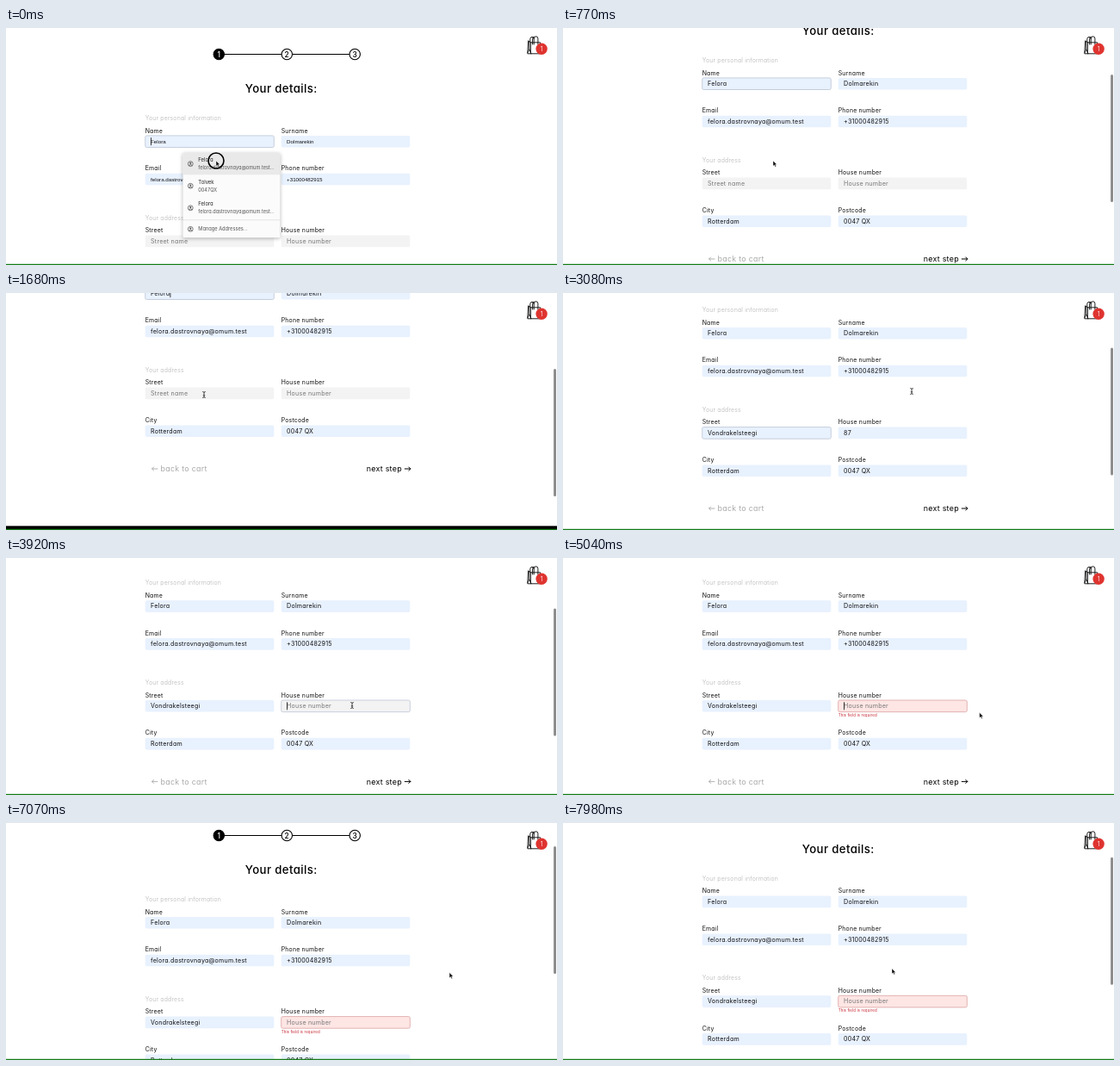
Recreate the animation shown at these times as an HTML page. Size 640 by 275 pixels, loop 8 s.

```html
<!DOCTYPE html>
<html lang="en">
<head>
<meta charset="utf-8">
<title>Checkout details</title>
<style>
  html, body { margin: 0; width: 100%; height: 100%; overflow: hidden; background: #fff; }
  svg { display: block; width: 640px; height: 275px; }
  text { font-family: Inter, "Open Sans", sans-serif; font-feature-settings: "cv11"; white-space: pre; }
  .page text { letter-spacing: .03em; }
  .page text.preview { font-family: "Liberation Sans", Arial, sans-serif; font-size: 6.2px; letter-spacing: 0; }
  .menu { filter: drop-shadow(0 1px 2px rgba(0, 0, 0, .3)); }
</style>
</head>
<body>
<svg id="stage" viewBox="0 0 640 275"></svg>
<script>
const LOOP = 8000, STEP = 70;
const stage = document.getElementById('stage');

function el(parent, tag, attrs = {}) {
  const node = document.createElementNS('http://www.w3.org/2000/svg', tag);
  for (const k in attrs) node.setAttribute(k, attrs[k]);
  parent.appendChild(node);
  return node;
}
function label(parent, x, y, str, size, fill = '#111', weight = 400, anchor = 'start') {
  const node = el(parent, 'text', { x, y, fill, 'font-size': size, 'font-weight': weight, 'text-anchor': anchor });
  node.textContent = str;
  return node;
}
const box = (parent, x, y, width, height, fill, rx = 0) =>
  el(parent, 'rect', { x, y, width, height, fill, rx });
const line = (parent, d, stroke = '#000', width = 1) =>
  el(parent, 'path', { d, stroke, 'stroke-width': width, fill: 'none', 'stroke-linecap': 'round', 'stroke-linejoin': 'round' });
const show = (node, on) => node.setAttribute('visibility', on ? 'visible' : 'hidden');
const move = (node, x, y) => node.setAttribute('transform', `translate(${x} ${y})`);

// Scrolling page
const page = el(stage, 'g', { class: 'page' });
line(page, 'M247 30.5H405', '#000', 1.1);
[247.3, 326.3, 405.2].forEach((cx, i) => {
  el(page, 'circle', { cx, cy: 30.5, r: 6.2, fill: i ? '#fff' : '#000', stroke: '#000', 'stroke-width': 1.1 });
  label(page, cx, 33.6, i + 1, 8.4, i ? '#000' : '#fff', 500, 'middle');
});
label(page, 319.7, 75.1, 'Your details:', 13.2, '#000', 500, 'middle');
label(page, 161.7, 107, 'Your personal information', 6.9, '#b4b4b4', 300);
label(page, 161.7, 222.6, 'Your address', 6.9, '#b4b4b4', 300);

const LEFT = 161.7, RIGHT = 319.7;
function makeField(x, y, title, hint = '') {
  label(page, x, y + 2.5, title, 6.9);
  const rect = box(page, x, y + 5.9, 149.6, 13.6, '#e8f1fe', 1.8);
  rect.setAttribute('stroke-width', .8);
  const text = label(page, x + 6.4, y + 15.1, '', 7.1);
  const caret = box(page, x, y + 8.2, .8, 9, '#111');
  return { x, rect, text, caret, hint };
}
const name = makeField(LEFT, 119, 'Name');
const surname = makeField(RIGHT, 119, 'Surname');
const email = makeField(LEFT, 162.8, 'Email');
const phone = makeField(RIGHT, 162.8, 'Phone number');
const street = makeField(LEFT, 234.7, 'Street', 'Street name');
const house = makeField(RIGHT, 234.7, 'House number', 'House number');
const city = makeField(LEFT, 278.5, 'City');
const postcode = makeField(RIGHT, 278.5, 'Postcode');
const problem = label(page, RIGHT, 259.6, 'This field is required', 4.4, '#c4232f');

label(page, 179.6, 338.2, 'back to cart', 8.9, '#a9a9a9');
line(page, 'M176 335H169.6M171.6 333L169.6 335L171.6 337', '#a9a9a9', .9);
label(page, 418.7, 338.2, 'next step', 8.9, '#000');
line(page, 'M463.2 335H469.8M467.8 333L469.8 335L467.8 337', '#000', 1);
box(page, 0, 401.3, 640, 240, '#000');

function fill(f, value, { preview = false, focus = false, error = false, plain = false, caret = false, atStart = false } = {}) {
  f.text.textContent = value || f.hint;
  f.text.setAttribute('class', preview ? 'preview' : '');
  f.text.setAttribute('fill', value ? '#111' : '#777');
  f.rect.setAttribute('fill', error ? '#fde6e4' : value && !plain ? '#e8f1fe' : '#f3f3f3');
  f.rect.setAttribute('stroke', error ? '#dca3a3' : focus ? '#bcc5d4' : 'none');
  const shift = value && !atStart ? f.text.getComputedTextLength() + .2 : 0;
  f.caret.setAttribute('x', f.x + 6.4 + shift);
  show(f.caret, caret);
}

// Autofill menus
function makeMenu(y, rows) {
  const g = el(stage, 'g', { class: 'menu' });
  const bottom = y + rows.length * 25.6;
  box(g, 205.5, y, 112.8, bottom - y + 21.5, '#fbfbfb', 1.5);
  const active = box(g, 205.5, y, 112.8, 25.3, '#e9e9e9');
  const icon = cy => {
    el(g, 'circle', { cx: 214.3, cy, r: 2.9, fill: 'none', stroke: '#444', 'stroke-width': .7 });
    el(g, 'circle', { cx: 214.3, cy: cy - .8, r: 1, fill: '#444' });
    line(g, `M212.6 ${cy + 1.7}Q214.3 ${cy - .1} 216 ${cy + 1.7}`, '#444', .8);
  };
  rows.forEach(([top, sub], i) => {
    const ry = y + i * 25.6;
    icon(ry + 12.6);
    label(g, 223.3, ry + 10.2, top, 5.9, '#222');
    label(g, 223.3, ry + 19.2, sub, 5.6, '#555');
  });
  line(g, `M205.8 ${bottom + 1}H318`, '#dcdcdc', .7);
  icon(bottom + 11.5);
  label(g, 223.3, bottom + 13.6, 'Manage Addresses...', 5.7, '#555');
  return { g, active };
}
const MAIL = 'felora.dastrovnaya@omum.test';
const ROAD = 'Vondrakelsteegi';
const nameMenu = makeMenu(145, [['Felora', MAIL + '...'], ['Tolvek', '0047QX'], ['Felora', MAIL + '...']]);
const streetMenu = makeMenu(131, [[ROAD + ' 87', '0047QX']]);

// Fixed parts
line(stage, 'M609.8 16.8H620.6V29.8H609.8ZM609.8 16.8L606.6 14.8L605.8 29.8H609.8M605.9 28.5L607.8 24.8L609.8 29.5M607.8 24.8V16', '#111', .95);
line(stage, 'M611.6 19V12.4Q611.6 10.2 613.2 10.2M613.2 19V12.2Q613.4 9.8 615.6 9.8T617.9 12.2V19M608.8 16V12.6Q609 10.4 611.1 10.4T613.2 12.6', '#111', .95);
el(stage, 'circle', { cx: 622.1, cy: 24.2, r: 6.7, fill: '#df3430' });
label(stage, 622, 27, '1', 8, '#fff', 300, 'middle');
const bar = box(stage, 636.1, 0, 2.9, 148, '#8a8a8a', 1.5);
box(stage, 0, 273.8, 640, 1.2, '#127b14');

const ring = el(stage, 'circle', { r: 9, fill: 'none', stroke: '#000', 'stroke-width': 1.6 });
const arrow = el(stage, 'path', {
  d: 'M0 0V6.3L1.5 5L2.5 7.3L3.6 6.8L2.6 4.6H4.5Z', fill: '#000', stroke: '#fff', 'stroke-width': .5
});
const beam = line(stage, 'M-1.4 -3.5Q0 -3.5 0 -2.5V2.5Q0 3.5 -1.4 3.5M1.4 -3.5Q0 -3.5 0 -2.5M0 2.5Q0 3.5 1.4 3.5M-.8 .8H.8', '#222', .8);

// Timelines: [time, ...values]
const scrollKeys = [[0, 0], [400, 0], [560, 30], [770, 67], [1190, 92], [1400, 118], [1680, 131],
  [2870, 131], [2960, 110], [3080, 85], [3400, 75.6], [6400, 75.6], [6700, 38], [7070, 16], [7280, 16], [7600, 34], [7980, 40.3]];
const mouseKeys = [[0, 244, 154], [1190, 244, 154], [1600, 230, 118], [2200, 230, 118], [2400, 245, 143],
  [2600, 245, 140], [2800, 405, 114], [3430, 405, 114], [3700, 402, 171], [4080, 402, 171], [4340, 447, 261],
  [4700, 447, 261], [5040, 483.7, 179.3], [5600, 483.7, 179.3], [6370, 515, 173.5], [7280, 515, 173.5], [7960, 382, 168.8]];
const clicks = [0, 2100, 2450, 3780, 4480];
const barSpans = [[420, 2450], [2870, 3920], [6440, 9000]];

const linear = u => u;
const smooth = u => u * u * (3 - 2 * u);
function sample(keys, t, ease) {
  const i = keys.findIndex(k => k[0] > t);
  if (i < 0) return keys[keys.length - 1].slice(1);
  const a = keys[i - 1], b = keys[i];
  const u = ease((t - a[0]) / (b[0] - a[0]));
  return a.slice(1).map((v, j) => v + (b[j + 1] - v) * u);
}
const within = (t, a, b) => t >= a && t < b;
const blink = (t, from) => (t - from) % 1120 < 560;

function drawForm(t) {
  const preview = t < 70;
  const onName = t < 2100, onStreet = within(t, 2100, 3780), onHouse = t >= 3780;
  const hover = within(t, 2380, 2520), filled = t >= 2380, error = t >= 4480;
  fill(name, 'Felora', { preview, focus: onName, caret: onName && (t < 140 || blink(t, 140)), atStart: preview });
  fill(surname, 'Dolmarekin', { preview });
  fill(email, MAIL, { preview });
  fill(phone, '+31000482915', { preview });
  fill(city, 'Rotterdam', { preview });
  fill(postcode, '0047 QX', { preview });
  fill(street, filled ? ROAD : '', { preview: hover, focus: onStreet, caret: onStreet && blink(t, 2100), atStart: hover });
  const digits = !filled || t >= 3920 ? '' : t >= 3850 ? '8' : '87';
  fill(house, digits, { preview: hover, focus: onHouse, error, plain: t >= 3850, caret: onHouse && blink(t, 3780) });
  show(problem, error);
  show(nameMenu.g, t < 70);
  show(streetMenu.g, within(t, 2170, 2520));
  show(streetMenu.active, hover);
}

function drawPointer(t) {
  const [x, y] = sample(mouseKeys, t, smooth);
  const text = within(t, 1500, 2250) || within(t, 2730, 4150);
  move(arrow, x, y);
  move(beam, x, y);
  move(ring, x, y);
  show(arrow, !text);
  show(beam, text);
  show(ring, clicks.some(c => within(t, c, c + 140)));
}

function render(t) {
  const [scroll] = sample(scrollKeys, t, linear);
  move(page, 0, -scroll);
  bar.setAttribute('y', 18.4 + scroll * .532);
  const span = barSpans.find(([a, b]) => within(t, a, b + 200));
  bar.setAttribute('opacity', span ? Math.min(1, (span[1] + 200 - t) / 200) : 0);
  drawForm(t);
  drawPointer(t);
}

function tick(now) {
  render(Math.floor(now % LOOP / STEP) * STEP);
  requestAnimationFrame(tick);
}
render(0);
requestAnimationFrame(tick);
</script>
</body>
</html>
```
